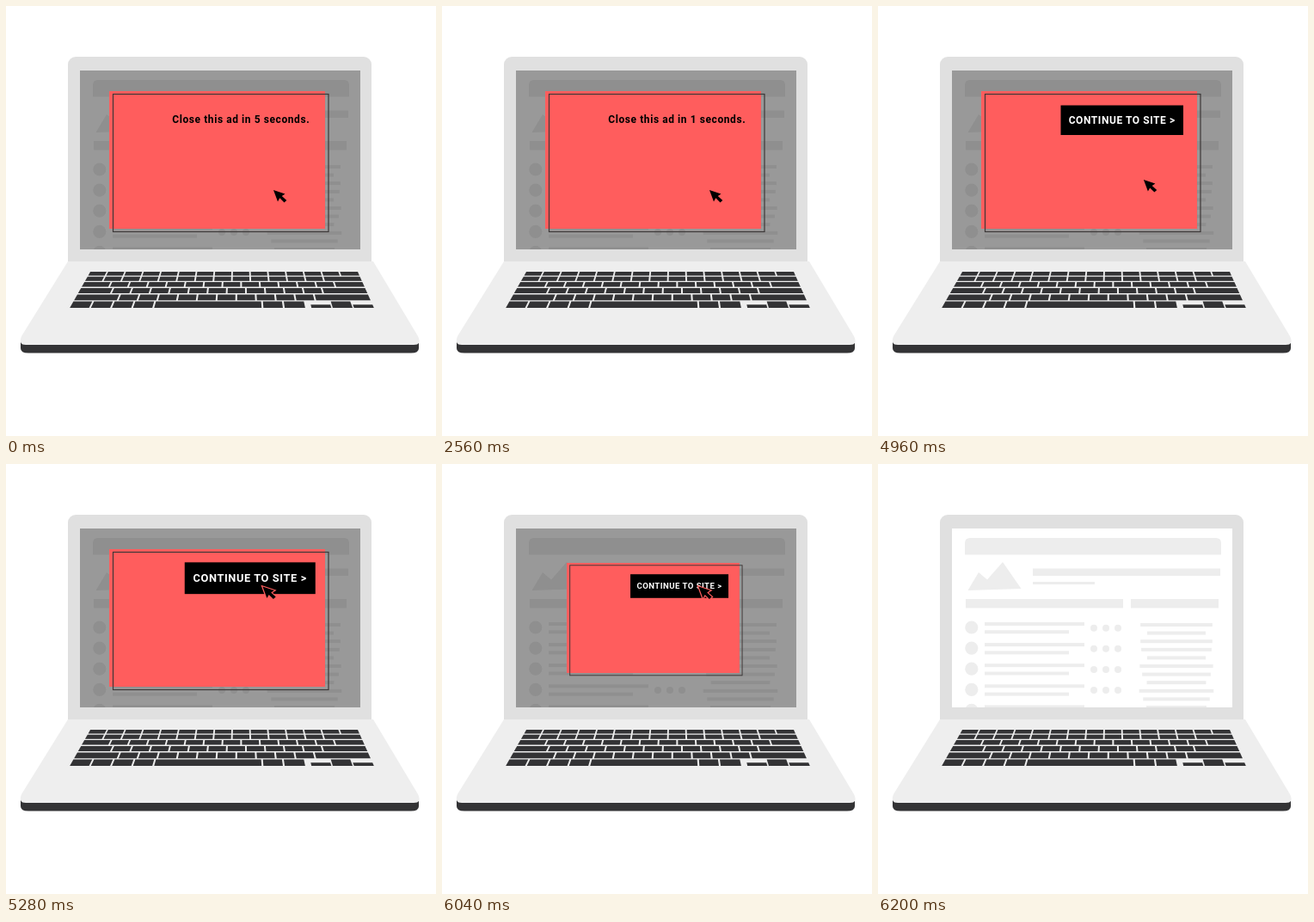
Write an HTML page that moves like this. It is 500x500 px and loops after 9.12 s.

```html
<!DOCTYPE html>
<html lang="en">
<head>
<meta charset="utf-8">
<title>Pop-up ad on a laptop</title>
<style>
  html, body { margin: 0; width: 100%; height: 100%; overflow: hidden; background: #fff; }
  svg { display: block; width: 100%; height: 100%; }
  text { font: bold 12px Roboto, sans-serif; letter-spacing: .574px; white-space: pre; }
</style>
</head>
<body>
<svg viewBox="0 0 500 500">
  <clipPath id="screen"><rect x="86" y="75" width="326" height="208"/></clipPath>
  <rect x="72" y="59" width="353" height="260" rx="9" fill="#e0e0e0"/>
  <rect x="86" y="75" width="326" height="208" fill="#fff"/>
  <g id="page" fill="#ededed" clip-path="url(#screen)">
    <path d="M101 105.500V92Q101 86 107 86H393Q399 86 399 92V105.500Z"/>
    <path d="M104.500 147L117 126L127 134.500L145 114L166.500 145Z"/>
  </g>

  <path fill="#333335" d="M17 390H480V398Q480 403.500 471 403.500H26Q17 403.500 17 398Z"/>
  <path fill="#eee" d="M72 297H427L479 384Q484 394 474 394H23Q14 394 18 384Z"/>
  <g id="keys" fill="#333335"></g>

  <rect id="shade" x="86" y="75" width="326" height="208" opacity=".4"/>
  <g id="ad">
    <rect x="120" y="99" width="251" height="160" fill="#ff5d5d"/>
    <rect x="124.500" y="102.500" width="250.500" height="160" fill="none" stroke="#3c3838" stroke-width="1.200"/>
    <text id="notice" x="193.300" y="136"></text>
    <g id="button">
      <rect x="212.500" y="115.500" width="142.500" height="34.500"/>
      <text x="221.700" y="137" fill="#fff">CONTINUE TO SITE &gt;</text>
    </g>
  </g>
  <path id="cursor" stroke="#ff5d5d" stroke-width="2.400" paint-order="stroke"
        d="M311 214L324.500 218.500L320.800 221L326.300 226L323.500 228.500L318.300 223.300L316 227.500Z"/>
</svg>
<script>
const LOOP = 9120, STEP = 40, CLOSED = 6200;
const $ = id => document.getElementById(id);
const clamp = v => Math.min(1, Math.max(0, v));

function add(parent, tag, attrs) {
  const el = document.createElementNS("http://www.w3.org/2000/svg", tag);
  for (const name in attrs) el.setAttribute(name, attrs[name]);
  $(parent).append(el);
}
const bar = (x, y, width, height = 4) => add("page", "rect", { x, y, width, height });
const dot = (cx, cy, r) => add("page", "circle", { cx, cy, r });

function drawPage() {
  bar(180, 121.5, 218, 8.5);
  bar(180, 137, 72, 3);
  bar(102, 157, 183, 10.5);
  bar(294, 157, 102, 10.5);
  for (let i = 0; i < 5; i++) {
    const y = 184 + i * 24.1;
    bar(124, y, 116);
    bar(124, y + 9.3, 98);
    dot(108.8, y + 6, 7.6);
    for (let j = 0; j < 3; j++) dot(251 + j * 14, y + 6.7, 4);
  }
  // Ragged, centred paragraph
  for (let i = 0; i < 11; i++) {
    const half = 39 - 5 * Math.cos((i - 1) * 2.167);
    bar(347 - half, 185 + i * 9.6, 2 * half);
  }
}

// The keyboard is 15 units wide; rows grow taller and wider towards the viewer
const UNITS = 15, GAP = .09;
const rowTop = row => 309 + 5.4 * row + .3 * row * row;

function key(row, from, to, start = 0) {
  const bottom = rowTop(row + 1) - 1.3;
  const top = rowTop(row) + start * (bottom - rowTop(row));
  const at = (unit, y) => {
    const left = 95.5 - (y - 313.5) * .57;
    const right = 411 + (y - 313.5) * .45;
    return `${left + unit / UNITS * (right - left)} ${y}`;
  };
  add("keys", "path", {
    d: `M${at(from, top)}L${at(to - GAP, top)}L${at(to - GAP, bottom)}L${at(from, bottom)}Z`
  });
}

// One first key, unit keys, then a last key that fills the row
function keyRow(row, first, count) {
  for (let i = 0; i < count; i++)
    key(row, i && first + i - 1, i < count - 1 ? first + i : UNITS + GAP);
}

function drawKeys() {
  keyRow(0, 1, 15);
  keyRow(1, 1, 14);
  keyRow(2, 1.5, 14);
  keyRow(3, 1.75, 13);
  keyRow(4, 2.25, 12);
  for (let i = 0; i < 4; i++) key(5, i * 1.04, (i + 1) * 1.04);
  key(5, 4.16, 9.55);
  key(5, 9.55, 10.6);
  key(5, 10.6, 11.7);
  for (let i = 0; i < 3; i++) key(5, 11.92 + i * 1.05, 12.99 + i * 1.05, i === 1 ? 0 : .5);
}

const scaleAt = (s, x, y) => `translate(${x} ${y}) scale(${s}) translate(${-x} ${-y})`;

function draw(time) {
  const t = Math.floor((time % LOOP) / STEP) * STEP;
  const progress = (from, to) => clamp((t - from) / (to - from));

  const seconds = Math.max(1, 5 - Math.floor((t + 320) / 720));
  $("notice").textContent = `Close this ad in ${seconds} seconds.`;
  $("notice").setAttribute("opacity", 1 - progress(3680, 3760));

  const pulse = 1 - Math.abs(2 * progress(5200, 5440) - 1);
  $("button").setAttribute("opacity", progress(3760, 3840));
  $("button").setAttribute("transform", scaleAt(1 + .1 * pulse, 283.7, 132.7));

  const move = progress(4920, 5160);
  $("cursor").setAttribute("transform", `translate(${-12.6 * move} ${-71.4 * move})`);

  $("ad").setAttribute("transform", scaleAt(1 - progress(6000, CLOSED), 245.3, 179));
  for (const id of ["shade", "ad", "cursor"]) $(id).style.display = t < CLOSED ? "" : "none";
}

drawPage();
drawKeys();
const start = performance.now();
function frame() {
  draw(performance.now() - start);
  requestAnimationFrame(frame);
}
draw(0);
requestAnimationFrame(frame);
</script>
</body>
</html>
```
